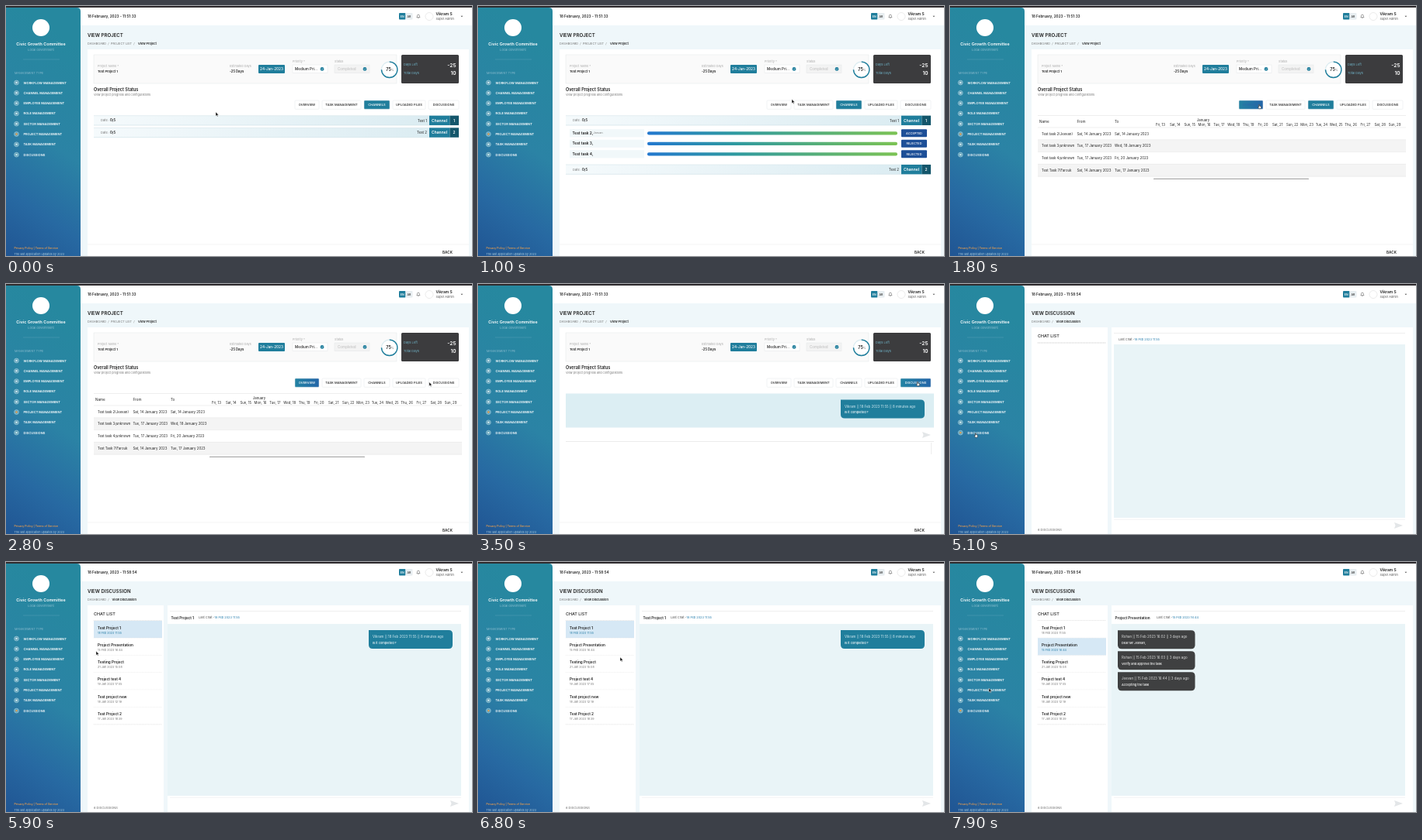
Write an HTML page that moves like this. It is 600 px wide and 323 px high and loops after 8 s.

```html
<!DOCTYPE html>
<html lang="en">
<head>
<meta charset="utf-8">
<title>Project dashboard</title>
<style>
html, body { margin: 0; width: 100%; height: 100%; overflow: hidden; background: #eff7fa; }
svg { display: block; width: 100vw; height: 100vh; font-family: Inter, "Open Sans", sans-serif; }
text { white-space: pre; }
</style>
</head>
<body>
<svg id="stage" viewBox="0 0 600 323" preserveAspectRatio="none">
  <defs>
    <linearGradient id="side" x1="0.2" y1="0" x2="0" y2="1">
      <stop offset="0" stop-color="#26889f"/><stop offset=".45" stop-color="#2b83a5"/>
      <stop offset=".75" stop-color="#2769a2"/><stop offset="1" stop-color="#205593"/>
    </linearGradient>
    <linearGradient id="row">
      <stop offset="0" stop-color="#f5fafc"/><stop offset="1" stop-color="#d9ebf1"/>
    </linearGradient>
    <linearGradient id="progress">
      <stop offset="0" stop-color="#2378cf"/><stop offset=".35" stop-color="#2f9aa0"/>
      <stop offset="1" stop-color="#7cc354"/>
    </linearGradient>
    <linearGradient id="pressed">
      <stop offset="0" stop-color="#2383a3"/><stop offset="1" stop-color="#2365a8"/>
    </linearGradient>
  </defs>
  <g id="scenes"></g>
  <g id="cursor" stroke-linejoin="round">
    <path id="arrow" d="M0 0V5.2L1.3 4.1 2.1 5.9 3 5.5 2.2 3.8H3.8Z" fill="#111" stroke="#fff" stroke-width=".4"/>
    <path id="hand" d="M-.5 0Q0-.6 .5 0V1.7L2.6 2.3V4L2 5.2H-.3L-1.6 3.1-.5 3Z" fill="#fff" stroke="#222" stroke-width=".55"/>
  </g>
</svg>
<script>
const TEAL = '#207e9c', NAVY = '#1d4f97', INK = '#222', GREY = '#777', PALE = '#aaa';
const ORANGE = '#f0a04b', WASH = '#e9f4f7';

const rect = (x, y, w, h, fill, extra = '') =>
  `<rect x="${x}" y="${y}" width="${w}" height="${h}" fill="${fill}" ${extra}/>`;
const circle = (x, y, r, fill, extra = '') =>
  `<circle cx="${x}" cy="${y}" r="${r}" fill="${fill}" ${extra}/>`;
const line = (x1, y, x2, color, extra = '') =>
  `<path d="M${x1} ${y}H${x2}" stroke="${color}" stroke-width=".6" ${extra}/>`;
const text = (x, y, label, size = 4, fill = INK, weight = 400, anchor = 'start') =>
  `<text x="${x}" y="${y}" font-size="${size}" fill="${fill}" font-weight="${weight}" text-anchor="${anchor}">${label}</text>`;
const each = (items, draw) => items.map(draw).join('');
const border = 'stroke="#e3e6e8" stroke-width=".5"';

function sidebar(active) {
  const items = ['WORKFLOW', 'CHANNEL', 'EMPLOYEE', 'ROLE', 'SECTOR', 'PROJECT', 'TASK', 'DISCUSSIONS'];
  return `<path d="M0 2H91Q96 2 96 7V323H0Z" fill="url(#side)"/>` +
    circle(45, 28, 11, '#fff') +
    text(45, 50.5, 'Civic Growth Committee', 5.4, '#fff', 600, 'middle') +
    text(45, 57.5, 'Local Government', 3.9, '#8fc0d2', 400, 'middle') +
    line(22, 69, 69, '#4d9ab2') +
    text(11, 87.5, 'MANAGEMENT TYPE', 3.7, '#86b9cc') +
    each(items, (name, i) => {
      const y = 99 + i * 13.3;
      return circle(13.5, y, 2.9, '#5fa3bb', 'stroke="#b5d6e1" stroke-width=".6"') +
        circle(13.5, y, 1.2, i === active ? ORANGE : '#d5e8ee') +
        text(22.5, y + 1.5, i < 7 ? name + ' MANAGEMENT' : name, 4.05, '#fff', 600);
    }) +
    text(10.5, 313.5, 'Privacy Policy | Terms of Service', 3.6, ORANGE, 500) +
    text(10.5, 321.5, 'The last application updates by 2023', 3.7, '#a9cbdc');
}

function frame(title, trail, clock, active) {
  return rect(0, 0, 600, 323, '#eff7fa') + rect(96, 2, 504, 23, '#fff') +
    rect(0, 0, 600, 2, '#302d30') + sidebar(active) +
    text(105, 15, `18 February, 2023 - ${clock}`, 4.65, INK, 600) +
    rect(506, 9, 8.5, 8.5, TEAL, 'rx="1"') + text(510.2, 14.6, 'EN', 3.5, '#fff', 600, 'middle') +
    rect(514.5, 9, 9, 8.5, '#e8eef1', 'rx="1"') + text(519, 14.6, 'AR', 3.5, '#444', 600, 'middle') +
    '<path d="M528.8 14.7H533L532.4 13.7V12.6Q532.4 11.2 530.9 11.2T529.4 12.6V13.7ZM530.3 15.5H531.5" fill="none" stroke="#555" stroke-width=".55"/>' +
    circle(545, 13.5, 5, '#fff', 'stroke="#ddd" stroke-width=".6"') +
    text(553.5, 12.2, 'Vikram S', 4.9, INK, 600) + text(553.5, 17.6, 'Super Admin', 3.8, '#555') +
    '<path d="M585.6 12.8H588.2L586.9 14.3Z" fill="#444"/>' +
    text(105, 40.3, title, 6.1, INK, 600) +
    text(105, 50.3, trail[0], 3.9, GREY) + text(trail[1], 50.3, trail[2], 3.95, INK, 600);
}

function badge(x, y) {
  return circle(x, y, 2.4, TEAL) +
    `<path d="M${x - 1} ${y}l.8.8 1.3-1.5" fill="none" stroke="#fff" stroke-width=".5"/>`;
}

const tabList = [['OVERVIEW', 372, 31], ['TASK MANAGEMENT', 407, 50], ['CHANNELS', 461, 33],
  ['UPLOADED FILES', 498, 42], ['DISCUSSIONS', 544, 39]];

function tabs(active, pressed) {
  return each(tabList, ([label, x, w], i) => {
    const fill = i === pressed ? 'url(#pressed)' : i === active ? TEAL : '#fff';
    const color = i === pressed && i !== active ? '#2c6ba8' : i === active ? '#fff' : INK;
    return rect(x, 122, w, 11.3, fill, `rx="1" ${border}`) +
      text(x + w / 2, 129.2, label, 4.05, color, 500, 'middle');
  });
}

function projectPage(body, active, pressed) {
  return frame('VIEW PROJECT', ['DASHBOARD  /  PROJECT LIST  /', 170, 'View Project'], '11:51:33', 5) +
    rect(105, 56, 491, 267, '#fff') + rect(113, 63, 390, 37, '#fafafa', border) +
    text(118, 79.2, 'Project Name *', 3.8, PALE) + text(118, 86.3, 'Test Project 1', 4.05, INK, 600) +
    text(288, 79.2, 'Estimated Days', 3.8, PALE) + text(288, 86.3, '-25 Days', 4.2, INK, 600) +
    rect(325, 76, 34, 11, TEAL, 'rx="1"') + text(342, 83.2, '24-Jan-2023', 4.7, '#fff', 500, 'middle') +
    text(369, 72.8, 'Priority *', 3.8, PALE) + rect(369, 76, 45, 10.5, '#fff', border) +
    text(372, 83, 'Medium Pri...', 4.6, INK, 500) + badge(407, 81.4) +
    text(423, 72.8, 'Status', 3.8, PALE) + rect(423, 76, 45, 10.5, '#f3f3f3', border) +
    text(427, 83, 'Completed', 4.6, '#bbb') + badge(462, 81.4) +
    circle(493.7, 82.3, 10.2, '#fff', 'stroke="#dcecf1" stroke-width="1.3"') +
    circle(493.7, 82.3, 10.2, 'none', `stroke="${TEAL}" stroke-width="1.4" pathLength="4" stroke-dasharray="3 1" transform="rotate(-90 493.7 82.3)"`) +
    text(492.6, 84.3, '75', 5.6, INK, 600, 'middle') + text(496, 84.1, '%', 3.5, GREY) +
    rect(509, 63, 74, 37, '#3c3c3e', 'rx="1.5"') +
    text(512, 77.4, 'Days Left', 4, '#6fb2c6') + text(579.5, 78.6, '-25', 6.7, '#fff', 600, 'end') +
    text(512, 88, 'Total Days', 4, '#6fb2c6') + text(579.5, 88.8, '10', 6.5, '#fff', 600, 'end') +
    text(113, 110, 'Overall Project Status', 5.5, INK, 600) +
    text(113, 115.6, 'View project progress and configurations', 3.75, GREY) +
    tabs(active, pressed) + body +
    line(105, 308, 596, '#eee') + text(568.5, 319.8, 'BACK', 4.6, INK, 600, 'middle');
}

function channelRow(y, n) {
  return rect(113, y, 470, 12.3, 'url(#row)') + line(113, y, 583, '#d5e5ea') + line(113, y + 12.3, 583, '#c9dde4') +
    text(122, y + 7.7, 'Date :', 4, GREY) + text(134, y + 7.7, '0/5', 4.3, INK, 600) +
    text(542, y + 7.8, `Test ${n}`, 4.5, INK, 400, 'end') +
    rect(545, y, 26.5, 12.3, TEAL) + rect(571.5, y, 11.5, 12.3, '#14566b') +
    text(558, y + 7.9, 'Channel', 5, '#fff', 600, 'middle') +
    text(577, y + 7.9, n, 4.8, '#fff', 600, 'middle');
}

function taskRow([label, state, person], i) {
  const y = 164.2 + i * 13.5;
  return rect(118, y - 5, 96, 10.2, '#f1f8fa') + text(121.5, y + 1.5, label, 4.8, INK, 600) +
    text(148.5, y + 1.2, person, 3.5, GREY) +
    rect(218, y - 2, 322, 4.2, 'url(#progress)', 'rx="2"') +
    rect(545, y - 5, 33, 10, NAVY, 'rx="1"') + text(561.5, y + 1.5, state, 3.9, '#fff', 500, 'middle');
}

function schedule() {
  const names = ['Fri', 'Sat', 'Sun', 'Mon', 'Tue', 'Wed', 'Thu'];
  const rows = [['Test task 2(Jeevan)', 'Sat, 14', 'Sat, 14'], ['Test task 3(unknown', 'Tue, 17', 'Wed, 18'],
    ['Test task 4(unknown', 'Tue, 17', 'Fri, 20'], ['Test Task 7(Farouk', 'Sat, 14', 'Tue, 17']];
  return line(113, 141.5, 587, '#e2e2e2') + text(326, 148.7, 'January', 4.3, INK, 400, 'middle') +
    each([['Name', 115], ['From', 163.5], ['To', 212]], ([label, x]) => text(x, 150.8, label, 4.6)) +
    each(Array.from({length: 17}), (_, i) =>
      text(271 + i * 18.85, 154.6, `${names[i % 7]}, ${13 + i}`, 4.3, INK, 400, 'middle')) +
    each(rows, ([task, from, to], i) => {
      const y = 157 + i * 15.8;
      return rect(113, y, 474, 15.8, i % 2 ? '#f4f4f4' : '#fff') + line(113, y, 587, '#e6e6e6') +
        text(118, y + 9.6, task, 4.3) + text(163.5, y + 9.6, `${from} January 2023`, 4.4) +
        text(212, y + 9.6, `${to} January 2023`, 4.4);
    }) + line(113, 220.2, 587, '#e6e6e6') + rect(262, 222.7, 200, 1.3, '#aaa', 'rx=".6"');
}

function bubble(x, y, w, fill, head, message) {
  const h = 24, r = 5;
  const own = fill === TEAL;
  const shape = own
    ? `M${x + r} ${y}H${x + w - r}q${r} 0 ${r} ${r}V${y + h - r}q0 ${r} ${-r} ${r}H${x + r}q${-r} 0 ${-r} ${-r}V${y}Z`
    : `M${x} ${y}H${x + w - r}q${r} 0 ${r} ${r}V${y + h - r}q0 ${r} ${-r} ${r}H${x + r}q${-r} 0 ${-r} ${-r}Z`;
  return `<path d="${shape}" fill="${fill}"/>` +
    text(x + 5, y + 10, head, 4.4, own ? '#d7edf3' : '#ddd') + text(x + 5, y + 17.5, message, 3.95, '#fff', 500);
}

const ownBubble = y => bubble(467, y, 108, TEAL, 'Vikram || 18 Feb 2023 11:55 || 8 minutes ago', 'Is it completed ?');
const sendIcon = y => `<path d="M572 ${y - 4}L583 ${y}L572 ${y + 4}L573.5 ${y}Z" fill="#e3e6e8"/>`;

const discussionTab = rect(113, 141.5, 474, 44, '#dceef3') + ownBubble(149.5) + sendIcon(195) +
  line(113, 203.5, 587, '#ddd') + `<path d="M583.7 205V220" stroke="#ddd" stroke-width=".6"/>`;

const chats = [['Test Project 1', '18 Feb 2023 11:55'], ['Project Presentation', '15 Feb 2023 16:44'],
  ['Testing Project', '21 Jan 2023 15:08'], ['Project test 4', '19 Jan 2023 17:05'],
  ['Test project new', '18 Jan 2023 12:19'], ['Test Project 2', '17 Jan 2023 18:39']];

function discussionPage(selected, messages) {
  const loaded = selected >= 0;
  const top = loaded ? 80 : 78, left = loaded ? 208 : 211;
  const [title, date] = chats[Math.max(selected, 0)];
  const lastX = [217, 248, 266][selected + 1];
  const list = loaded ? each(chats, ([name, when], i) => {
    const y = 76 + i * 22.3, on = i === selected;
    return rect(113, y, 88, 22.3, on ? '#d6e8f5' : '#fff') +
      line(113, y + 22.3, 201, '#ccc', 'stroke-dasharray="1 1"') +
      text(118, y + 10.5, name, 4.7, INK, 600) + text(118, y + 16.5, when, 3.7, on ? '#2a7fa8' : GREY);
  }) : '';
  return frame('VIEW DISCUSSION', ['DASHBOARD  /', 136.5, 'View Discussion'], '11:58:54', 7) +
    rect(105, 56, 98, 267, '#fff') + rect(208, 56, 388, 267, '#fff') +
    text(113, 69.3, 'CHAT LIST', 5.4, INK, 500) +
    line(113, 76, 201, '#999', 'stroke-dasharray="1 1"') + list +
    text(113, 319, '6 DISCUSSIONS', 4, '#666') +
    line(211, 63.5, 586, '#e3e3e3') + (loaded ? text(212.5, 73.7, title, 4.6, INK, 600) : '') +
    text(lastX, 73.2, `Last Chat -<tspan fill="#287fae">${date}</tspan>`, 3.9, '#555') +
    rect(left, top, 586 - left, 302 - top, WASH) +
    line(211, 304.5, 586, '#eee') + sendIcon(312) + messages;
}

const replies = [['Rohan || 15 Feb 2023 16:02 || 3 days ago', 'Dear Mr Jeevan,'],
  ['Rohan || 15 Feb 2023 16:03 || 3 days ago', 'Verify and approve the task'],
  ['Jeevan || 15 Feb 2023 16:44 || 3 days ago', 'Accepting the task']];
const tasks = [['Test task 2,', 'ACCEPTED', 'Jeevan'], ['Test task 3,', 'REJECTED', ''], ['Test task 4,', 'REJECTED', '']];

// Start time in ms and picture of each screen
const scenes = [
  [0, projectPage(channelRow(141.7, 1) + channelRow(157.4, 2), 2)],
  [500, projectPage(channelRow(141.7, 1) + each(tasks, taskRow) + channelRow(205, 2), 2)],
  [1600, projectPage(schedule(), 2, 0)],
  [2050, projectPage(schedule(), 0, 0)],
  [3100, projectPage(discussionTab, 4, 4)],
  [4700, discussionPage(-1, '')],
  [5600, discussionPage(0, ownBubble(88))],
  [7300, discussionPage(1, each(replies, ([head, message], i) => bubble(216, 88.3 + i * 27, 99.5, '#3f4041', head, message)))]
];

// Pointer stops: time, x, y
const stops = [[0, 270, 137], [300, 270, 137], [500, 275, 147], [700, 290, 146], [1000, 404, 120.5],
  [1500, 398, 127.5], [2100, 398, 127.5], [3000, 566, 126.5], [3700, 566, 126.5], [4600, 33, 193],
  [5300, 33, 193], [6200, 145, 88], [6400, 145, 88], [6800, 183, 123], [7200, 150, 109],
  [7400, 150, 109], [7900, 50, 163], [8000, 50, 163]];
const handTimes = [[1500, 2200], [2900, 3800], [4500, 5400], [6100, 6500], [7100, 7500]];

const $ = id => document.getElementById(id);
$('scenes').innerHTML = each(scenes, ([, picture]) => `<g>${picture}</g>`);
const groups = [...$('scenes').children];

function draw(now) {
  const t = Math.floor((now % 8000) / 100) * 100;
  const current = scenes.findLastIndex(([start]) => t >= start);
  groups.forEach((g, i) => g.style.display = i === current ? '' : 'none');

  const next = stops.findIndex(([time]) => time > t);
  const [t0, x0, y0] = stops[next - 1], [t1, x1, y1] = stops[next];
  const k = (t - t0) / (t1 - t0), ease = k * k * (3 - 2 * k);
  $('cursor').setAttribute('transform', `translate(${x0 + (x1 - x0) * ease} ${y0 + (y1 - y0) * ease})`);
  const pointing = handTimes.some(([a, b]) => t >= a && t < b);
  $('hand').style.display = pointing ? '' : 'none';
  $('arrow').style.display = pointing ? 'none' : '';
}

const began = performance.now();
function tick() {
  draw(performance.now() - began);
  requestAnimationFrame(tick);
}
tick();
</script>
</body>
</html>
```
